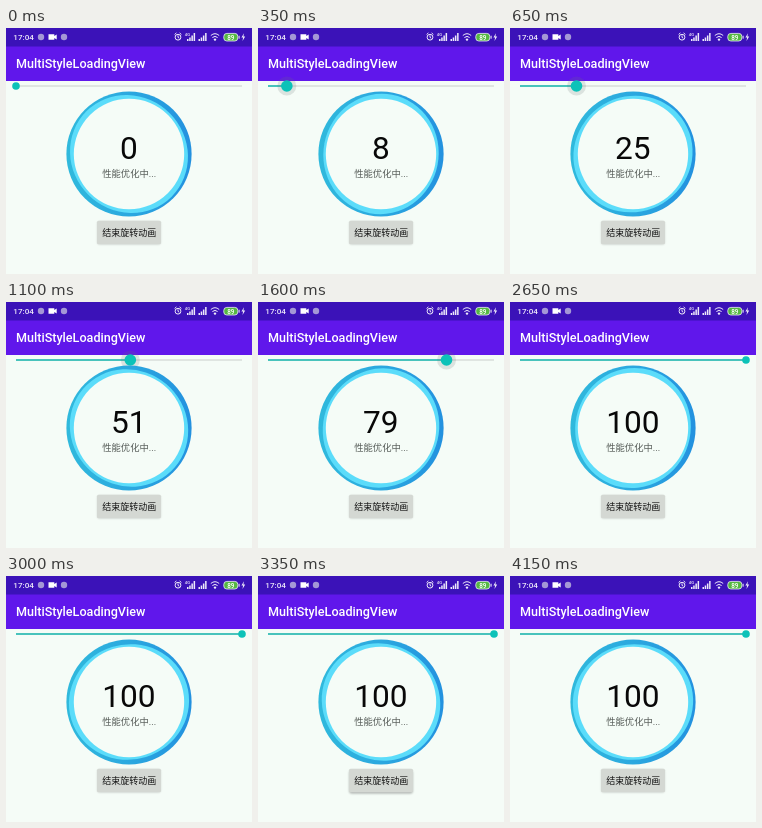
An HTML page that plays this animation: 246 by 246 pixels, repeating every 4.2 s.

```html
<!DOCTYPE html>
<html lang="zh">
<head>
<meta charset="utf-8">
<title>MultiStyleLoadingView</title>
<style>
  html, body { margin: 0; width: 100%; height: 100%; overflow: hidden; background: #f5fcf7; }
  svg { display: block; width: 100vw; height: 100vh; }
  text { font-family: Roboto, "Noto Sans CJK SC", "Noto Sans CJK", sans-serif; }
  .mid { text-anchor: middle; }
</style>
</head>
<body>
<svg viewBox="0 0 246 246">
  <defs>
    <linearGradient id="outer">
      <stop offset="0" stop-color="#30b9dc"/>
      <stop offset=".5" stop-color="#2ba8df"/>
      <stop offset="1" stop-color="#2391df"/>
    </linearGradient>
    <filter id="soft" x="-20%" y="-30%" width="140%" height="180%">
      <feGaussianBlur stdDeviation="1.2"/>
    </filter>
    <path id="signal" d="M0 8V6h1.5v2zM2.2 8V4.5h1.5V8zM4.4 8V2.5h1.5V8zM6.6 8V0h1.5v8z"/>
  </defs>

  <rect width="246" height="246" fill="#f5fcf7"/>
  <rect width="246" height="19" fill="#3b12b8"/>
  <rect y="18.5" width="246" height="34.5" fill="#6017eb"/>

  <g fill="#eeeafa">
    <text x="7.3" y="12" font-size="8.1" font-weight="500">17:04</text>
    <circle cx="35" cy="9" r="3.2" fill="#a498d6"/>
    <path d="M42.5 6.2h5.8v1.7l2.4-1.5v5.2l-2.4-1.5v1.7h-5.8z" fill="#fff"/>
    <circle cx="58" cy="9" r="3.2" fill="#a498d6"/>
    <g fill="none" stroke="#eeeafa" stroke-width="1">
      <circle cx="172" cy="9.2" r="2.9"/>
      <path d="M172 7.4v2l1.3.8M168.6 6.5l1.8-1.6M175.4 6.5l-1.8-1.6"/>
      <path d="M204.8 7.5q4.2-3.6 8.4 0M206.4 9.5q2.6-2.2 5.2 0"/>
    </g>
    <circle cx="209" cy="11.6" r="1.2"/>
    <text x="178.8" y="8.4" font-size="4.2" font-weight="500">4G</text>
    <use href="#signal" x="181" y="5"/>
    <use href="#signal" x="192.5" y="5"/>
    <rect x="217.8" y="5.4" width="14" height="7.6" rx="3" fill="#55b842" stroke="#eeeafa" stroke-width=".8"/>
    <rect x="232.6" y="7.7" width="1" height="3"/>
    <text class="mid" x="224.8" y="11.5" font-size="6.4" font-weight="500" fill="#fff">89</text>
    <path d="M238 5.2l-2.6 4.4h1.7l-.6 3.4 2.7-4.6h-1.8z"/>
  </g>
  <text x="10" y="40.2" font-size="12.6" font-weight="500" fill="#fff">MultiStyleLoadingView</text>

  <path d="M10 58H236" stroke="#c9d0cb" stroke-width="1.2"/>
  <path id="track" stroke="#16b8b0" stroke-width="1.5"/>
  <circle id="halo" cy="58" r="9.5" fill="#6b7773" opacity=".18"/>
  <circle id="thumb" cy="58" fill="#0cc2b8"/>

  <g transform="translate(123 126)">
    <circle r="62.6" fill="url(#outer)"/>
    <ellipse id="glow" rx="60.3" ry="57.6" fill="#5bdcfa"/>
    <circle r="55.2" fill="#f5fcf7"/>
  </g>
  <text id="count" class="mid" x="122.8" y="131.3" font-size="31.6" fill="#080808"></text>
  <text class="mid" x="123.2" y="148.6" font-size="9.3" fill="#555b57">性能优化中...</text>

  <rect id="shadow" x="91.3" width="63.4" height="23" rx="2" filter="url(#soft)"/>
  <rect x="91" y="192.8" width="64" height="23.4" rx="1.5" fill="#d4d8d3"/>
  <text class="mid" x="123.2" y="207.6" font-size="9" fill="#151515">结束旋转动画</text>
</svg>
<script>
const LOOP = 4200, STEP = 50, SPIN = 2260;
const DRAG = [[0, 0], [200, 0], [650, 25], [1600, 79], [1980, 100], [LOOP, 100]];
const $ = id => document.getElementById(id);
const set = (id, attrs) => {
  for (const key in attrs) $(id).setAttribute(key, attrs[key]);
};
const clamp = v => Math.max(0, Math.min(1, v));
const ramp = (t, from, to) => clamp((t - from) / (to - from));

function progressAt(t) {
  const i = DRAG.findIndex(([time]) => time > t);
  const [t0, p0] = DRAG[i - 1], [t1, p1] = DRAG[i];
  return p0 + (p1 - p0) * ramp(t, t0, t1);
}

function draw(t) {
  const progress = progressAt(t);
  const x = 10 + 2.26 * progress;
  const held = ramp(t, 100, 250) * (1 - ramp(t, 2200, 2400));
  const press = ramp(t, 3150, 3300) * (1 - ramp(t, 3500, 3700));

  set("track", { d: `M10 58H${x}` });
  set("thumb", { cx: x, r: 3.8 + 2 * held });
  set("halo", { cx: x, opacity: 0.18 * held });
  set("glow", { transform: `rotate(${45 + t / SPIN * 360})` });
  set("shadow", { y: 193.6 + press, opacity: 0.16 + 0.14 * press });
  $("count").textContent = Math.round(progress);
}

const start = performance.now();
function tick() {
  const t = (performance.now() - start) % LOOP;
  draw(Math.floor(t / STEP) * STEP);
  requestAnimationFrame(tick);
}
tick();
</script>
</body>
</html>
```
